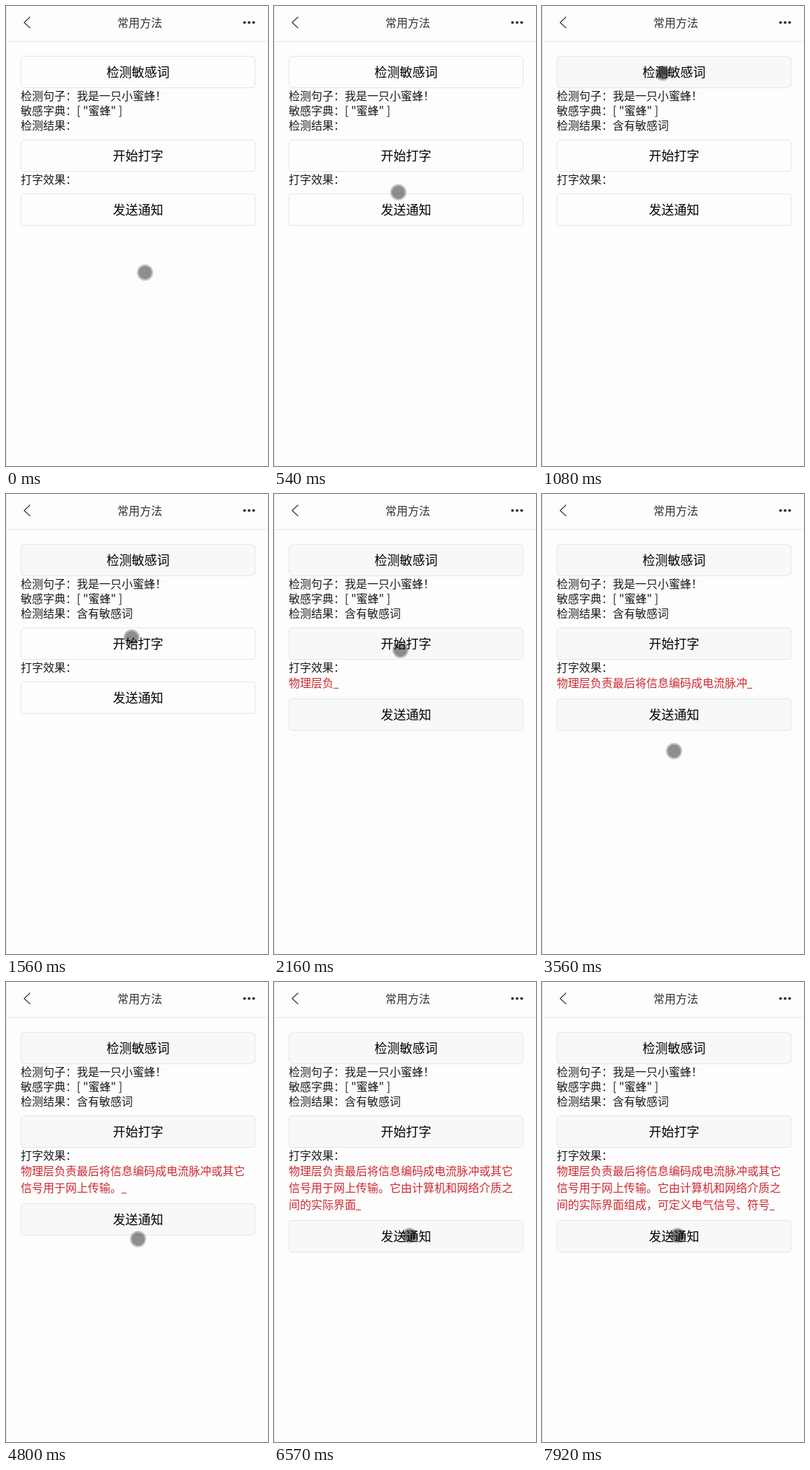
Write an HTML page with a canvas that moves like this. It is 374x655 px and loops after 8000 ms.

```html
<!DOCTYPE html>
<html lang="zh-CN">
<head>
<meta charset="utf-8">
<title>常用方法</title>
<style>
html, body { margin: 0; width: 100%; height: 100%; overflow: hidden; background: #fdfdfd; }
canvas { display: block; width: 374px; height: 655px; }
</style>
</head>
<body>
<canvas id="stage"></canvas>
<script>
const W = 374, H = 655, LOOP = 8000;
const CJK = '"Noto Sans CJK SC", "Noto Sans CJK", sans-serif';
const PER_LINE = 20, CHAR_W = 16, LEFT = 21;
const TYPE_START = 1740, TYPE_STEP = 104.4;
const MESSAGE = '物理层负责最后将信息编码成电流脉冲或其它' +
  '信号用于网上传输。它由计算机和网络介质之' +
  '间的实际界面组成，可定义电气信号、符号';

// Pointer path: time, x, y
const PATH = [
  [0, 198.5, 379.5], [50, 198.5, 379.5], [230, 232, 460.5], [370, 205, 370],
  [490, 190, 300], [600, 163, 225], [680, 153, 140], [750, 172.5, 95.5],
  [1200, 172.5, 95.5], [1620, 180.5, 222], [2800, 180.5, 222],
  [3280, 188.5, 366], [6250, 188.5, 366], [6420, 193.5, 361]
];
const PRESSES = [[930, 1150], [1770, 1850], [6500, LOOP]];

const canvas = document.getElementById('stage');
const ctx = canvas.getContext('2d');
const scale = window.devicePixelRatio || 1;
canvas.width = W * scale;
canvas.height = H * scale;
ctx.scale(scale, scale);

function text(str, x, y, size = 16, color = '#1c1c1c', align = 'left', family = CJK) {
  ctx.font = `${size}px ${family}`;
  ctx.fillStyle = color;
  ctx.textAlign = align;
  ctx.fillText(str, x, y);
}

function button(label, y, active) {
  ctx.beginPath();
  ctx.roundRect(LEFT + 0.5, y + 0.5, 334, 45, 4.5);
  ctx.fillStyle = active ? '#f8f8f8' : '#fdfdfd';
  ctx.fill();
  ctx.strokeStyle = '#e4e4e4';
  ctx.lineWidth = 1;
  ctx.stroke();
  text(label, 188.5, y + 30, 18, '#000', 'center');
}

function disc(x, y, r, color) {
  ctx.beginPath();
  ctx.arc(x, y, r, 0, Math.PI * 2);
  ctx.fillStyle = color;
  ctx.fill();
}

function header() {
  ctx.fillStyle = '#e6e6e6';
  ctx.fillRect(0, 0, 1, H);
  ctx.fillRect(0, 50, W, 1);
  ctx.beginPath();
  ctx.moveTo(34.5, 15.5);
  ctx.lineTo(26, 23.5);
  ctx.lineTo(34.5, 31.5);
  ctx.strokeStyle = '#444';
  ctx.lineWidth = 1.4;
  ctx.stroke();
  text('常用方法', 191, 30, 16, '#333', 'center');
  for (const x of [340.5, 347, 353.5]) disc(x, 23.5, 2, '#333');
}

function pointerAt(t) {
  const i = PATH.findIndex(p => p[0] > t);
  if (i < 0) return PATH[PATH.length - 1].slice(1);
  const [t0, x0, y0] = PATH[i - 1], [t1, x1, y1] = PATH[i];
  const k = (t - t0) / (t1 - t0);
  return [x0 + (x1 - x0) * k, y0 + (y1 - y0) * k];
}

function pointer(t) {
  const [x, y] = pointerAt(t);
  const pressed = PRESSES.some(([a, b]) => t >= a && t < b);
  disc(x, y, pressed ? 11 : 11.5, 'rgba(0,0,0,.24)');
  disc(x, y, pressed ? 9 : 9.3, pressed ? 'rgba(0,0,0,.38)' : 'rgba(0,0,0,.26)');
}

function typed(count) {
  const rows = Math.ceil(count / PER_LINE);
  for (let row = 0; row < rows; row++) {
    const part = MESSAGE.slice(row * PER_LINE, Math.min(count, (row + 1) * PER_LINE));
    const y = 275 + row * 24;
    text(part, LEFT, y, 16, '#cc2a30');
    if (row === rows - 1) {
      text('_', LEFT + part.length * CHAR_W, y, 16, '#cc2a30', 'left', '"Open Sans", sans-serif');
    }
  }
  return rows;
}

function draw(t) {
  ctx.fillStyle = '#fdfdfd';
  ctx.fillRect(0, 0, W, H);
  header();
  const count = Math.min(MESSAGE.length, Math.max(0, Math.floor((t - TYPE_START) / TYPE_STEP)));

  button('检测敏感词', 71, t >= 930);
  text('检测句子：我是一只小蜜蜂！', LEFT, 134);
  text('敏感字典：[ "蜜蜂" ]', LEFT, 155);
  text('检测结果：' + (t >= 1050 ? '含有敏感词' : ''), LEFT, 176);

  button('开始打字', 190, t >= 1770);
  text('打字效果：', LEFT, 253);
  const rows = typed(count);
  button('发送通知', 267 + rows * 24, rows > 0);
  pointer(t);
}

const start = performance.now();
function frame() {
  draw((performance.now() - start) % LOOP);
  requestAnimationFrame(frame);
}
frame();
</script>
</body>
</html>
```
